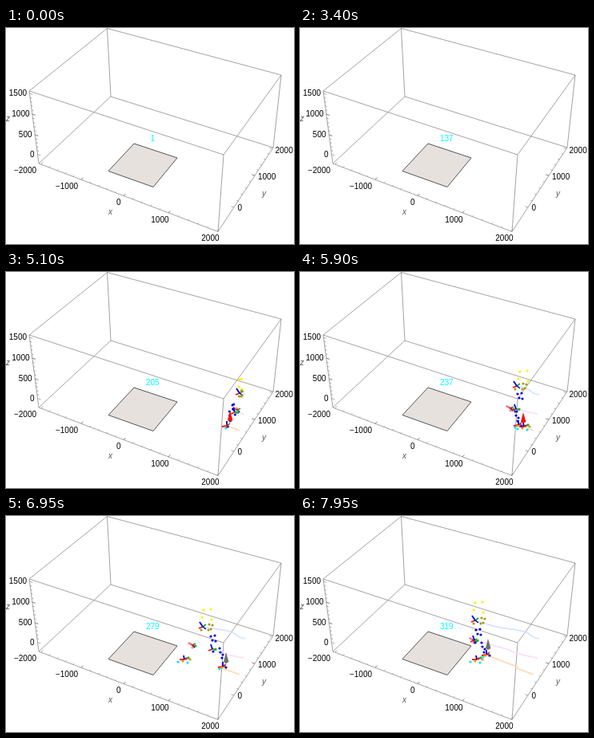
These frames come from a looping animation (360 px wide and 271 px high, 8000 ms). An HTML page with a canvas:

```html
<!DOCTYPE html>
<html lang="en">
<head>
<meta charset="utf-8">
<title>Walking markers in a 3D plot</title>
<style>
html, body { margin: 0; width: 100%; height: 100%; overflow: hidden; background: #fff; }
canvas { display: block; width: 360px; height: 271px; }
</style>
</head>
<body>
<canvas id="stage"></canvas>
<script>
const W = 360, H = 271, LOOP = 8000, STEP = 50;
const canvas = document.getElementById('stage');
const ctx = canvas.getContext('2d');
const ratio = window.devicePixelRatio || 1;
canvas.width = Math.round(W * ratio);
canvas.height = Math.round(H * ratio);

const FONT = '"Liberation Sans", Arial, sans-serif';
const RED = '#f01010', GREEN = '#20b030', BLUE = '#0000d8', CYAN = '#00e5f5';
const YELLOW = '#ffee00', OLIVE = '#a89a10', ORANGE = '#f58a10', PINK = '#f28aa0';

// Paths are [time, x, y]; dots are [colour, dx, dy]; axes are red, green, blue tips.
const thorax = {
  path: [[4800, 299, 154], [5100, 292, 152], [5500, 283, 146], [5900, 271, 143],
         [6950, 246, 139], [7950, 219, 131]],
  trail: '#d5e6ff',
  dots: [[OLIVE, 8, -3], [OLIVE, 12, -2], [OLIVE, 7, 4], [OLIVE, 10, 3], [OLIVE, -2, 4]],
  axes: [[-5, 2], [4, -3], [-4, -6]], extra: [4, 3]
};
const pelvis = {
  path: [[4800, 297, 178], [5100, 286, 176], [5900, 270, 172], [6950, 258, 167], [7950, 218, 156]],
  trail: '#fbe0f6',
  dots: [[GREEN, 4, 0], [BLUE, 1, 3]],
  axes: [[-5, 2], [5, 1], [-2, -6]]
};
const rightFoot = {
  path: [[4800, 292, 199], [5100, 276, 193], [5900, 273, 192], [6950, 271, 189],
         [7350, 266, 187], [7650, 250, 181], [7950, 233, 174]],
  trail: '#ffdbb8',
  dots: [[CYAN, -4, 3], [ORANGE, -1, 1], [BLUE, 4, 1], [RED, 2, -1]],
  axes: [[-6, 1], [4, -3], [0, -6]]
};
const leftFoot = {
  path: [[5150, 294, 197], [5400, 287, 198], [5900, 280, 194], [6200, 272, 190],
         [6700, 230, 180], [6950, 223, 180], [7950, 221, 180]],
  dots: [[CYAN, -8, 3], [CYAN, 4, 4], [ORANGE, 7, 0], [GREEN, 5, -2], [ORANGE, -2, 2], [RED, 2, -1]],
  axes: [[-6, 0], [6, -3], [-1, -5]]
};
const hand = {
  path: [[5000, 292, 173], [5100, 289, 173], [5900, 263, 171], [6950, 233, 162], [7950, 217, 156]],
  dots: [[PINK, -3, -2], [RED, 1, 0], [GREEN, 4, 1], [PINK, 0, 3]],
  axes: [[-5, -3], [4, -2], [3, 3]]
};
const head = {
  path: [[4900, 297, 142], [5100, 293, 140], [5900, 279, 130], [6950, 251, 123], [7950, 223, 114]],
  dots: [[YELLOW, -4, -5], [YELLOW, 5, -6], [YELLOW, -6, 4], [YELLOW, 6, 7]]
};
const trunk = {
  path: [[4900, 291, 172], [5100, 284, 170], [5900, 275, 156], [6950, 259, 154], [7950, 223, 146]],
  dots: [[BLUE, -3, -3], [BLUE, 2, -4], [BLUE, -1, 2], [BLUE, 3, 3]]
};
const leg = {
  path: [[4900, 288, 184], [5100, 280, 181], [5900, 271, 181], [6950, 269, 172], [7950, 229, 165]],
  dots: [[BLUE, -2, -6], [BLUE, 2, 2], [BLUE, 1, 6], [BLUE, -1, -1]]
};
const shank = {
  path: [[4950, 284, 183], [5100, 280, 181], [5900, 279, 183], [6950, 275, 178],
         [7350, 271, 175], [7650, 253, 168], [7950, 235, 161]]
};
const parts = [head, thorax, trunk, hand, pelvis, leg, leftFoot, rightFoot];

function slope(path, i, k) {
  const a = path[Math.max(i - 1, 0)], b = path[Math.min(i + 1, path.length - 1)];
  return (b[k] - a[k]) / (b[0] - a[0]);
}

function at(path, t) {
  const last = path.length - 1;
  if (t >= path[last][0]) return path[last].slice(1);
  let i = 0;
  while (t >= path[i + 1][0]) i++;
  const a = path[i], b = path[i + 1], d = b[0] - a[0];
  const u = (t - a[0]) / d, u2 = u * u, u3 = u2 * u;
  return [1, 2].map(k =>
    (2 * u3 - 3 * u2 + 1) * a[k] + (u3 - 2 * u2 + u) * d * slope(path, i, k) +
    (3 * u2 - 2 * u3) * b[k] + (u3 - u2) * d * slope(path, i + 1, k));
}

function line(points, color, width, closed) {
  ctx.beginPath();
  points.forEach(([x, y]) => ctx.lineTo(x, y));
  if (closed) ctx.closePath();
  ctx.strokeStyle = color;
  ctx.lineWidth = width;
  ctx.stroke();
}

function text(str, x, y, align = 'left', color = '#000', style = '') {
  ctx.font = `${style} 10px ${FONT}`;
  ctx.textAlign = align;
  ctx.fillStyle = color;
  ctx.fillText(str, x, y);
}

function dot(x, y, color) {
  ctx.fillStyle = color;
  ctx.beginPath();
  ctx.arc(x, y, 1.6, 0, 7);
  ctx.fill();
}

// Ticks between major points, divided evenly, with every n-th one long.
function ticks(majors, n, dx, dy) {
  for (let i = 0; i < majors.length - 1; i++) {
    const [x0, y0] = majors[i], [x1, y1] = majors[i + 1];
    for (let j = 0; j <= n; j++) {
      const x = x0 + (x1 - x0) * j / n, y = y0 + (y1 - y0) * j / n;
      const s = j % n ? 0.55 : 1;
      line([[x, y], [x + dx * s, y + dy * s]], '#777', 0.6);
    }
  }
}

function drawBox() {
  const top = [[126.5, 0.5], [344, 59], [272, 159], [29, 79]];
  const base = [[131, 86], [334, 150], [265, 255.5], [41, 170]];
  line(top, '#8c8c8c', 0.8, true);
  line(base, '#8c8c8c', 0.8, true);
  top.forEach((p, i) => line([p, base[i]], '#8c8c8c', 0.8));
  ticks([[29.4, 82], [32.8, 108], [36.3, 134], [39.5, 158.5]], 5, 4, 1.4);
  ticks([[44, 171], [94, 190.3], [147, 210.7], [203, 232], [264, 255]], 5, 2.3, -2.6);
  ticks([[285, 225], [311, 185.2], [333, 151.5]], 5, -3.6, -1.3);
}

function drawLabels() {
  [['1500', 26, 85], ['1000', 29.5, 111], ['500', 32.5, 137], ['0', 35.5, 162],
   ['−2000', 38, 182], ['−1000', 90, 202], ['0', 143.5, 222],
   ['1000', 203.5, 244], ['2000', 266.5, 267]]
    .forEach(([s, x, y]) => text(s, x, y, 'right'));
  [['0', 289.5, 229], ['1000', 315, 190], ['2000', 336.5, 157]]
    .forEach(([s, x, y]) => text(s, x, y));
  [['x', 128, 234], ['y', 320, 211], ['z', 0, 117]]
    .forEach(([s, x, y]) => text(s, x, y, 'left', '#555', 'italic'));
}

function drawPlate() {
  const plate = [[160, 145], [214, 163], [184, 199.5], [128, 179.5]];
  ctx.beginPath();
  plate.forEach(([x, y]) => ctx.lineTo(x, y));
  ctx.fillStyle = '#e7e1de';
  ctx.fill();
  line(plate, '#444', 0.9, true);
}

function drawTrail(part, t) {
  const points = [];
  for (let s = part.path[0][0]; s < t; s += STEP) points.push(at(part.path, s));
  points.push(at(part.path, t));
  line(points, part.trail, 1.8);
}

function drawPart(part, t, spread) {
  const [x, y] = at(part.path, t);
  if (part.axes) {
    [RED, GREEN, BLUE].forEach((color, i) => {
      const [dx, dy] = part.axes[i];
      line([[x, y], [x + dx, y + dy]], color, 1.8);
    });
    if (part.extra) line([[x, y], [x + part.extra[0], y + part.extra[1]]], BLUE, 1.5);
  }
  part.dots.forEach(([color, dx, dy]) => dot(x + dx * spread, y + dy, color));
}

function drawCone(t) {
  const [x, y] = at(shank.path, t);
  ctx.fillStyle = t < 6400 ? '#ee1111' : '#707070';
  ctx.beginPath();
  ctx.moveTo(x, y - 7);
  ctx.lineTo(x + 3.5, y + 5);
  ctx.lineTo(x, y + 7);
  ctx.lineTo(x - 3, y + 5);
  ctx.fill();
}

function draw(t) {
  ctx.setTransform(ratio, 0, 0, ratio, 0, 0);
  ctx.fillStyle = '#fff';
  ctx.fillRect(0, 0, W, H);
  ctx.lineJoin = 'round';
  drawBox();
  drawLabels();
  drawPlate();
  const live = parts.filter(p => t >= p.path[0][0]);
  live.filter(p => p.trail).forEach(p => drawTrail(p, t));
  const spread = Math.min(1, Math.max(0.3, 0.3 + 0.7 * (t - 5100) / 800));
  live.forEach(p => drawPart(p, t, spread));
  if (t >= shank.path[0][0]) drawCone(t);
  text(String(1 + t / 25), 183.3, 141.5, 'center', '#00ffff');
}

function frame() {
  const t = performance.now() % LOOP;
  draw(Math.floor(t / STEP) * STEP);
  requestAnimationFrame(frame);
}
frame();
</script>
</body>
</html>
```
